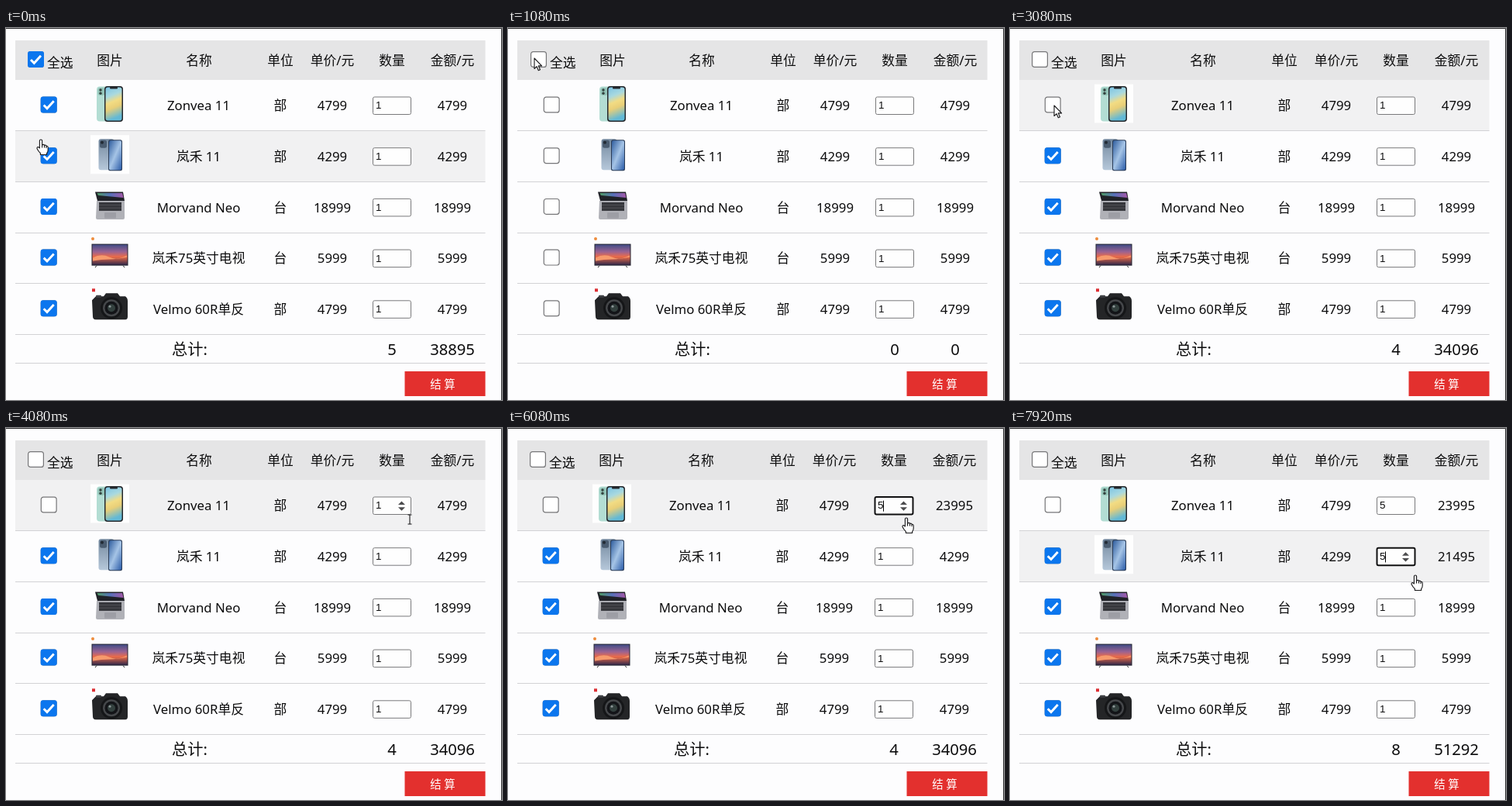
These frames come from a looping animation (640 by 480 pixels, 8000 ms). An HTML page:

```html
<!DOCTYPE html>
<html lang="zh-CN">
<head>
<meta charset="utf-8">
<title>购物车</title>
<style>
  html, body { margin: 0; width: 100%; height: 100%; overflow: hidden; background: #fdfdfe; }
  svg { display: block; width: 640px; height: 480px; }
  text { font: 16.8px "Noto Sans", "Noto Sans CJK SC", "Noto Sans CJK", sans-serif; fill: #0c0c0d; }
  .mid { text-anchor: middle; }
  .big { font-size: 20.2px; }
  .qty { font: 13.4px "Liberation Sans", Arial, sans-serif; }
  .pay { font-size: 14.4px; fill: #fff; }
</style>
</head>
<body>
<svg id="stage" viewBox="0 0 640 480">
  <defs>
    <linearGradient id="screenA" x2="0.2" y2="1">
      <stop offset="0" stop-color="#7cc4e4"/><stop offset=".3" stop-color="#a9d9e0"/>
      <stop offset=".5" stop-color="#f2dc84"/><stop offset=".68" stop-color="#e9cf78"/>
      <stop offset="1" stop-color="#62b9d6"/>
    </linearGradient>
    <linearGradient id="screenB" x2="1" y2="1">
      <stop offset="0" stop-color="#2f5d9e"/><stop offset=".5" stop-color="#a5c4e6"/>
      <stop offset="1" stop-color="#2b5ca8"/>
    </linearGradient>
    <linearGradient id="backB" x2="0" y2="1">
      <stop offset="0" stop-color="#74899f"/><stop offset="1" stop-color="#b6c8da"/>
    </linearGradient>
    <linearGradient id="sky" x2="0" y2="1">
      <stop offset="0" stop-color="#424d86"/><stop offset=".35" stop-color="#9a6292"/>
      <stop offset=".6" stop-color="#ec6b48"/><stop offset="1" stop-color="#34294a"/>
    </linearGradient>
    <linearGradient id="glow">
      <stop offset="0" stop-color="#4e9a62"/><stop offset=".5" stop-color="#5570b8"/>
      <stop offset="1" stop-color="#a558a8"/>
    </linearGradient>
  </defs>
</svg>
<script>
const LOOP = 8000, TICK = 1000 / 12;
const TOP = 67, ROW = 65.7;
const COL = { pic: 109, name: 248.5, unit: 354, price: 421, qty: 498, sum: 576 };
const INK = '#18181a';

// Product pictures, each in a 50 x 50 box
const phoneA = `
  <rect x="8" y="3" width="22" height="45" rx="4" fill="#b3ddd3"/>
  <rect x="9.500" y="4.500" width="9" height="10" rx="3" fill="#93c4b8"/>
  <circle cx="13" cy="7.500" r="1.700" fill="#34433f"/><circle cx="13" cy="11.700" r="1.700" fill="#34433f"/>
  <rect x="18" y="2.500" width="24" height="46" rx="4" fill="#25282c"/>
  <rect x="19.500" y="4" width="21" height="43" rx="3" fill="url(#screenA)"/>
  <rect x="25" y="3.500" width="10" height="2.500" rx="1" fill="#25282c"/>`;
const phoneB = `
  <rect x="10.500" y="5" width="20" height="40" rx="3" fill="url(#backB)"/>
  <rect x="12" y="6.500" width="9" height="10" rx="2.500" fill="#4a5c70"/>
  <circle cx="15" cy="9.500" r="2" fill="#222a34"/>
  <rect x="23" y="6" width="18" height="40" rx="2.500" fill="#2b3d58"/>
  <rect x="24" y="7" width="16" height="38" rx="2" fill="url(#screenB)"/>`;
const laptop = `
  <path d="M6 7.500H42L44 19H9Z" fill="#202228"/>
  <path d="M8.500 9H41L42.500 15L10 12Z" fill="url(#glow)"/>
  <path d="M8 19H44V41Q44 43 42 43H9Q7 43 7 41Z" fill="#b0b1b7"/>
  <rect x="11" y="21" width="29" height="11" fill="#35363b"/>
  <path d="M11 24.500H40M11 28.300H40" stroke="#5c5d63" stroke-width=".7"/>
  <rect x="18" y="34" width="15" height="7.500" rx="1" fill="#9d9ea5"/>`;
const tv = `
  <circle cx="3" cy="2.500" r="2" fill="#ee8c3c"/>
  <rect x="1.500" y="9" width="47" height="28" fill="#24242e"/>
  <rect x="2.500" y="10" width="45" height="26" fill="url(#sky)"/>
  <path d="M3 27Q14 21 24 26T47 24V26Q34 29 24 29T3 31Z" fill="#f79a6c"/>
  <path d="M8 37L6 39.500M42 37L44 39.500" stroke="#333"/>`;
const camera = `
  <rect x="2" y="1" width="4" height="4" fill="#dc2f34"/>
  <path d="M2 16L7 11H17L20 7H35L38 11H45Q48 13 48 17V37Q48 41 45 41H7Q3 41 3 37Z" fill="#242527"/>
  <rect x="7" y="9.500" width="7" height="3" rx="1" fill="#404246"/>
  <circle cx="27" cy="26" r="14" fill="#151618"/>
  <circle cx="27" cy="26" r="11" fill="#45474a"/>
  <circle cx="27" cy="26" r="8.500" fill="#131418"/>
  <circle cx="27" cy="26" r="5" fill="#33403e"/>
  <circle cx="25" cy="24" r="1.500" fill="#8d9698"/>`;

const items = [
  { name: 'Zonvea 11', unit: '部', price: 4799, pic: phoneA },
  { name: '岚禾 11', unit: '部', price: 4299, pic: phoneB },
  { name: 'Morvand Neo', unit: '台', price: 18999, pic: laptop },
  { name: '岚禾75英寸电视', unit: '台', price: 5999, pic: tv },
  { name: 'Velmo 60R单反', unit: '部', price: 4799, pic: camera }
];

// Each press raises the quantity by one; the amount follows on release
const presses = [[56, 61, 67, 70], [85, 88, 90, 92], [], [], []];
const releases = [[59, 64, 69, 72], [86, 89, 91, 93], [], [], []];

// Stops of the pointer: tick, x, y, shape from then on
const path = [
  [0, 45, 144, 'hand'], [7, 37, 66, 'arrow'], [10, 34, 39, 'arrow'], [18, 34, 39, 'arrow'],
  [20, 60, 64, 'hand'], [25, 173, 95, 'hand'], [29, 173, 95, 'hand'], [32, 66, 98, 'arrow'],
  [33, 57, 99, 'arrow'], [38, 57, 100, 'arrow'], [39, 57, 136, 'hand'], [40, 56, 160, 'arrow'],
  [43, 56, 161, 'arrow'], [44, 100, 152, 'hand'], [49, 521, 118, 'beam'], [50, 522, 114, 'hand'],
  [51, 522, 113, 'hand'], [53, 512, 92, 'arrow'], [72, 512, 92, 'arrow'], [73, 514, 116, 'hand'],
  [75, 515, 160, 'arrow'], [79, 515, 162, 'arrow'], [80, 516, 159, 'arrow'], [93, 516, 159, 'arrow'],
  [94, 520, 178, 'hand'], [95, 523, 190, 'hand']
];

const text = (x, y, s, cls = 'mid', id = '') => `<text x="${x}" y="${y}" class="${cls}" id="${id}">${s}</text>`;
const rowTop = i => TOP + i * ROW;

const checkbox = (id, x, y) => `<g id="${id}" transform="translate(${x} ${y})">
  <rect x=".6" y=".6" width="19.800" height="19.800" rx="3" fill="#fff" stroke="#767678" stroke-width="1.200"/>
  <g class="tick"><rect width="21" height="21" rx="3" fill="#0b76ee"/>
  <path d="M4 11L8.300 15.300L17 5.800" fill="none" stroke="#fff" stroke-width="2.900"/></g></g>`;

const spinner = i => `<g id="spin${i}">
  <rect id="up${i}" x="503" y="-7.500" width="15" height="8"/>
  <path d="M506 -1.200L510.500 -5.700L515 -1.200ZM506 2L510.500 6.500L515 2Z" fill="#4b4b4d"/></g>`;

function itemRow(it, i) {
  const top = rowTop(i), base = top + 39.2;
  return `<g transform="translate(${COL.pic} ${top + 5.5})"><rect id="plate${i}" width="50" height="50" fill="#fefefe"/>${it.pic}</g>
    ${checkbox('check' + i, 44.7, top + 21.5)}
    ${text(COL.name, base, it.name)}${text(COL.unit, base, it.unit)}${text(COL.price, base, it.price)}
    <g transform="translate(0 ${top + 33.2})">
      <rect x="473.500" y="-11.200" width="49" height="22.500" rx="2" fill="#fefefe" id="field${i}"/>
      ${text(477, 4.2, 1, 'qty', 'qty' + i)}
      <path id="caret${i}" d="M484.500 -6.500V7.500" stroke="#000"/>${spinner(i)}
    </g>
    ${text(COL.sum, base, '', 'mid', 'sum' + i)}`;
}

const heads = { 图片: 134, 名称: 249, 单位: 354, '单价/元': 421, 数量: 498, '金额/元': 576 };
const lines = [1, 2, 3, 4, 5].map(i => Math.floor(rowTop(i)) + 0.5).concat(432.5);
const pointers = `<g id="pointer" fill="#fff" stroke="${INK}" stroke-width="1.100" stroke-linejoin="round">
  <path id="arrow" d="M0 0V13.500L3.100 10.700L5.300 15.800L7.500 14.800L5.300 9.900H9.600Z"/>
  <path id="hand" d="M-1.600 11V1.500Q-1.600 0 0 0T1.600 1.500V7Q4 5.600 4.500 7.400Q6.700 6.500 7 8.500Q9.200 8 9.200 10.200V13.500Q9.200 16 7.600 17.500V19.500H-.6V17.500Q-3 15.500 -5 11.400Q-5 9.200 -3.300 9.600ZM1.600 7V10.500M4.500 7.600V10.500M7 8.700V11"/>
  <path id="beam" fill="none" d="M-2.500 -6H2.500M0 -6V6M-2.500 6H2.500"/></g>`;

const stage = document.getElementById('stage');
stage.insertAdjacentHTML('beforeend', `
  <rect width="640" height="480" fill="#fdfdfe"/>
  <rect x="12" y="16" width="606.500" height="51" fill="#e5e5e6"/>
  <rect id="hover" x="12" width="606.500" height="${ROW}" fill="#f1f1f2"/>
  <path d="${lines.map(y => `M12 ${y}H618.500`).join('')}" stroke="#d2d2d5"/>
  <g id="table">
    ${checkbox('checkAll', 28, 30)}${text(53, 51.3, '全选', '')}
    ${Object.entries(heads).map(([s, x]) => text(x, 48, s)).join('')}
    ${items.map(itemRow).join('')}
    ${text(237, 422, '总计:', 'mid big')}
    ${text(COL.qty, 422, '', 'mid big', 'count')}${text(COL.sum, 422, '', 'mid big', 'total')}
  </g>
  <rect x="514.500" y="443" width="104" height="32" fill="#e3302e"/>
  ${text(563.5, 464.5, '结 算', 'mid pay')}
  <path d="M0 .5H639.500V480" fill="none" stroke="#2c2c2e"/>
  ${pointers}`);

const $ = id => document.getElementById(id);
const show = (el, on) => { el.style.display = on ? '' : 'none'; };
const put = (id, s) => { if ($(id).textContent !== String(s)) $(id).textContent = s; };
const tickBox = (id, on) => show($(id).querySelector('.tick'), on);
const qtyAt = (list, n) => 1 + list.filter(t => t <= n).length;

function pointerAt(n) {
  const k = path.findLastIndex(p => p[0] <= n);
  const [t0, x0, y0, kind] = path[k];
  const [t1, x1, y1] = path[k + 1] || [t0 + 1, x0, y0];
  const f = (n - t0) / (t1 - t0);
  return { x: x0 + (x1 - x0) * f, y: y0 + (y1 - y0) * f, kind };
}

function isChecked(i, n) {
  if (n >= 13 && n < 17) return false;
  if (i === 0) return n < 35;
  return !(i === 1 && n >= 41 && n < 43);
}

function draw(n) {
  const p = pointerAt(n);
  const over = Math.floor((p.y - TOP) / ROW);
  const focus = n < presses[0][0] ? -1 : n < presses[1][0] ? 0 : 1;
  let count = 0, total = 0, all = true;

  items.forEach((it, i) => {
    const on = isChecked(i, n), focused = focus === i;
    const shown = qtyAt(presses[i], n), qty = qtyAt(releases[i], n);
    tickBox('check' + i, on);
    all = all && on;
    if (on) { count += qty; total += qty * it.price; }
    put('qty' + i, shown);
    put('sum' + i, qty * it.price);
    show($('plate' + i), over === i);

    const inField = over === i && p.x > 470 && p.kind !== 'hand';
    show($('spin' + i), focused || inField);
    show($('up' + i), inField && p.kind === 'arrow');
    $('up' + i).setAttribute('fill', shown > qty ? '#8a8a8c' : '#d3d3d5');
    show($('caret' + i), focused);
    $('field' + i).setAttribute('stroke', focused ? '#101011' : '#79797b');
    $('field' + i).setAttribute('stroke-width', focused ? 2 : 1);
  });

  tickBox('checkAll', all);
  put('count', count);
  put('total', total);
  // The columns shift slightly when the total is short
  $('table').setAttribute('transform', `translate(${total ? 0 : 1} 0)`);
  show($('hover'), over >= 0 && over < items.length);
  $('hover').setAttribute('y', rowTop(over));
  $('pointer').setAttribute('transform', `translate(${Math.round(p.x)} ${Math.round(p.y)})`);
  for (const k of ['arrow', 'hand', 'beam']) show($(k), k === p.kind);
}

const start = performance.now();
function frame(now) {
  const ms = Math.max(0, now - start) % LOOP;
  draw(Math.min(95, Math.floor((ms + 4) / TICK)));
  requestAnimationFrame(frame);
}
draw(0);
requestAnimationFrame(frame);
</script>
</body>
</html>
```
